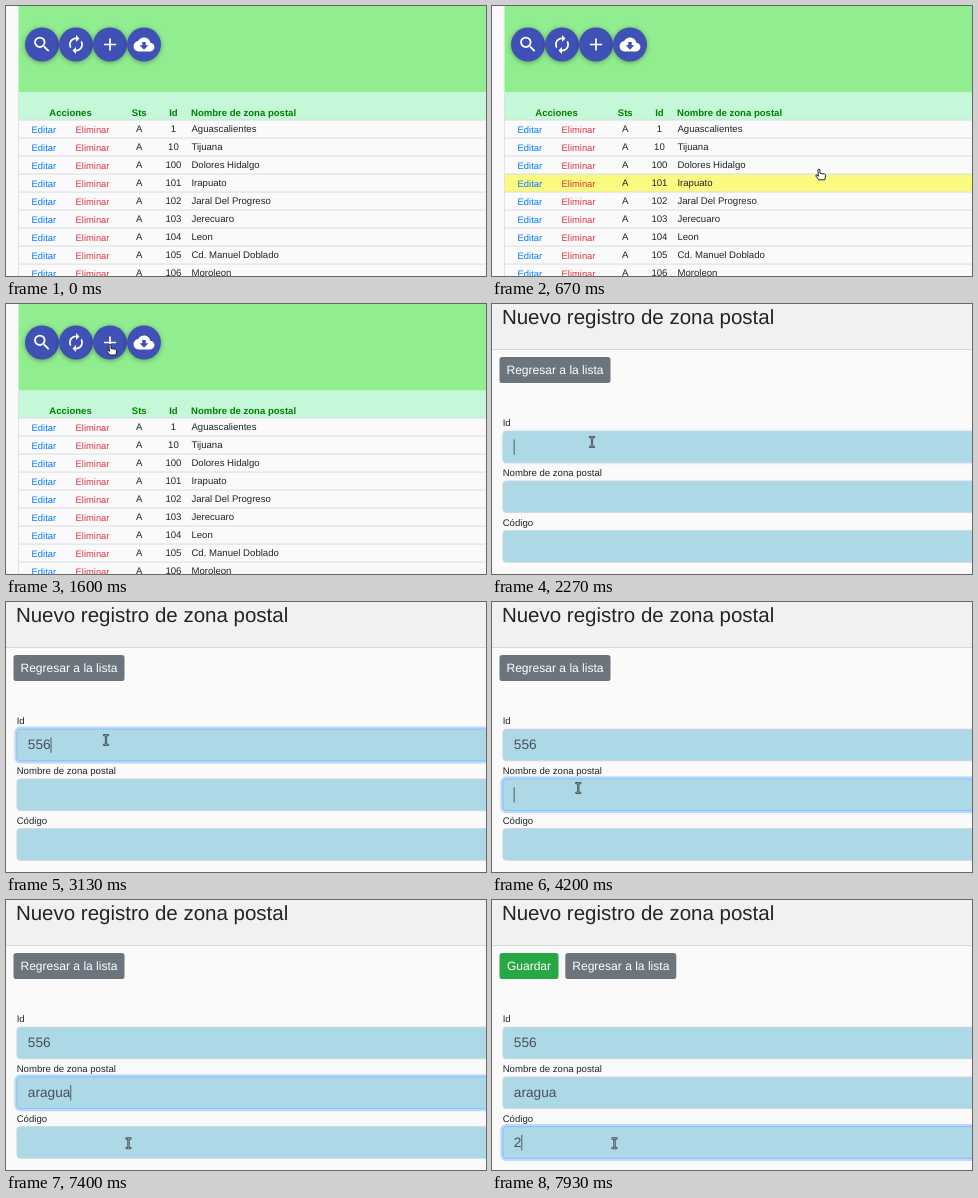
An HTML page that plays this animation: 480 by 270 pixels, repeating every 8000 ms.

```html
<!DOCTYPE html>
<html lang="es">
<head>
<meta charset="utf-8">
<title>Zonas postales</title>
<style>
html, body { margin: 0; width: 100%; height: 100%; overflow: hidden; background: #fafafa; }
svg { display: block; width: 480px; height: 270px; font: 9.6px "Liberation Sans", Arial, sans-serif; fill: #212529; text-rendering: geometricPrecision; }
.head { font-weight: bold; font-size: 9.55px; fill: #008000; }
.link { font-size: 9.4px; }
.mid { text-anchor: middle; }
.fab { filter: drop-shadow(0 1.8px 2.6px rgba(0,0,0,.34)); }
.title { font-size: 20.5px; }
.btn { font-size: 12.05px; fill: #fff; text-anchor: middle; }
.value { font-size: 13.7px; fill: #495057; }
.cursor { stroke-linejoin: round; stroke-linecap: round; }
</style>
</head>
<body>
<svg id="stage" viewBox="0 0 480 270" xmlns="http://www.w3.org/2000/svg"></svg>
<script>
const LOOP = 8000;
const stage = document.getElementById('stage');

function el(parent, name, attrs = {}, text) {
  const node = document.createElementNS('http://www.w3.org/2000/svg', name);
  for (const key in attrs) node.setAttribute(key, attrs[key]);
  if (text !== undefined) node.textContent = text;
  parent.appendChild(node);
  return node;
}
const rect = (p, x, y, width, height, fill, more) => el(p, 'rect', { x, y, width, height, fill, ...more });
const label = (p, x, y, text, cls = '', more) => el(p, 'text', { x, y, class: cls, ...more }, text);
const show = (node, on) => node.setAttribute('visibility', on ? 'visible' : 'hidden');

// --- List page ---
const ROW_TOP = 114, ROW_H = 18;
const zones = [
  [1, 'Aguascalientes'], [10, 'Tijuana'], [100, 'Dolores Hidalgo'], [101, 'Irapuato'],
  [102, 'Jaral Del Progreso'], [103, 'Jerecuaro'], [104, 'Leon'],
  [105, 'Cd. Manuel Doblado'], [106, 'Moroleon']
];
const list = el(stage, 'g');
rect(list, 0, 0, 480, 270, '#fafafa');
rect(list, 12.5, 0, 468, 86.6, '#90ee90');
rect(list, 12.5, 86.6, 468, 27.4, '#c5f8d9');
label(list, 64.5, 110, 'Acciones', 'head mid');
label(list, 133.2, 110, 'Sts', 'head mid');
label(list, 167.4, 110, 'Id', 'head mid');
label(list, 185, 110, 'Nombre de zona postal', 'head');

const rowBacks = zones.map(([id, name], i) => {
  const y = ROW_TOP + i * ROW_H, base = y + 12.4;
  const back = rect(list, 12.5, y, 468, ROW_H, '#fafafa');
  rect(list, 12.5, y - 0.4, 468, 0.9, '#d5d9dc');
  label(list, 25.6, base + 0.6, 'Editar', 'link', { fill: '#007bff' });
  label(list, 69.6, base + 0.6, 'Eliminar', 'link', { fill: '#dc3545' });
  label(list, 133.2, base, 'A', 'mid');
  label(list, 167.4, base, id, 'mid');
  label(list, 185.4, base, name);
  return back;
});
rect(list, 12.2, 87, 0.7, 183, '#d5d9dc');

const icons = [
  { d: 'M14.3 14.3L19.7 19.7M15 9.5a5.5 5.5 0 1 1-11 0a5.5 5.5 0 1 1 11 0', stroke: 2.1 },
  { d: 'M12 6v3l4-4-4-4v3c-4.42 0-8 3.58-8 8 0 1.57.46 3.03 1.24 4.26L6.7 14.8c-.45-.83-.7-1.79-.7-2.8 0-3.31 2.69-6 6-6zm6.76 1.74L17.3 9.2c.44.84.7 1.79.7 2.8 0 3.31-2.69 6-6 6v-3l-4 4 4 4v-3c4.42 0 8-3.58 8-8 0-1.57-.46-3.03-1.24-4.26z' },
  { d: 'M12 5v14M5 12h14', stroke: 2 },
  { d: 'M19.35 10.04C18.67 6.59 15.64 4 12 4 9.11 4 6.6 5.64 5.35 8.04 2.34 8.36 0 10.91 0 14c0 3.31 2.69 6 6 6h13c2.76 0 5-2.24 5-5 0-2.64-2.05-4.78-4.65-4.96zM17 13l-5 5-5-5h3V9h4v4h3z' }
];
icons.forEach(({ d, stroke }, i) => {
  const cx = 36 + i * 34, cy = 38.5;
  el(list, 'circle', { cx, cy, r: 17, fill: '#3f51b5', class: 'fab' });
  el(list, 'path', {
    d, transform: `translate(${cx} ${cy}) scale(.87) translate(-12 -12)`,
    fill: stroke ? 'none' : '#fff', stroke: stroke ? '#fff' : 'none', 'stroke-width': stroke || 0
  });
});

// --- Form page ---
const form = el(stage, 'g');
rect(form, 0, 0, 480, 270, '#fafafa');
rect(form, 0, 0, 480, 45, '#f1f1f1');
rect(form, 0, 45, 480, 0.9, '#d4d4d4');
label(form, 9.9, 20.3, 'Nuevo registro de zona postal', 'title');

function button(x, width, text, fill) {
  const g = el(form, 'g');
  rect(g, x, 53, width, 26, fill, { rx: 2.8 });
  label(g, x + width / 2, 70.3, text, 'btn');
  return g;
}
const back = button(7.5, 111, 'Regresar a la lista', '#6c757d');
const save = button(7.5, 59, 'Guardar', '#28a745');

// Each field: focus span, typed keys [time, text], blink-off spans
const fields = [
  { name: 'Id', y: 127, from: 2240, to: 3990,
    keys: [[2800, '5'], [2930, '55'], [3070, '556']], off: [[3600, 4000]] },
  { name: 'Nombre de zona postal', y: 176.8, from: 3990, to: 7520,
    keys: [[5670, 'a'], [5930, 'ar'], [6070, 'ara'], [6200, 'arag'], [6270, 'aragu'], [6400, 'aragua']],
    off: [[4600, 5200], [6930, 7400]] },
  { name: 'Código', y: 226.5, from: 7520, to: LOOP + 500, keys: [[7930, '2']], off: [] }
];
for (const f of fields) {
  label(form, 10.7, f.y - 5, f.name);
  f.ring = rect(form, 9.6, f.y - 1.2, 490, 34.3, 'none', { rx: 4.6, stroke: '#007bff', 'stroke-opacity': 0.25, 'stroke-width': 2.6 });
  rect(form, 10.9, f.y + 0.1, 490, 31.7, '#add8e6', { rx: 3.4, stroke: '#ced4da', 'stroke-width': 0.8 });
  f.edge = rect(form, 10.9, f.y + 0.1, 490, 31.7, 'none', { rx: 3.4, stroke: '#80bdff', 'stroke-width': 0.9 });
  f.value = label(form, 21.8, f.y + 20.4, '', 'value');
  f.caret = rect(form, 21.7, f.y + 8.4, 0.9, 15.4, '#495057');
}

// --- Mouse pointer, hot spot at 0,0 ---
const pointer = el(stage, 'g', { class: 'cursor' });
const shape = (d, fill, stroke, width) => el(pointer, 'path', { d, fill, stroke, 'stroke-width': width });
const arrow = shape('M0 0V10.6L2.5 8.4L4.2 12.3L6 11.5L4.3 7.7H7.4Z', '#fff', '#222', 1);
const hand = shape('M-.9 .6Q0-.5 .9 .6V4.3L5.6 5.1Q6.8 5.4 6.6 6.8L5.8 10.8H-.2L-3.1 7.1Q-3.4 5.8-2.3 6L-.9 7Z', '#fff', '#222', 1);
const beam = el(pointer, 'g');
for (const [stroke, width] of [['#2c3338', 2.3], ['#a9b4ba', 0.7]])
  el(beam, 'path', { d: 'M-2-4.8H2M0-4.8V4.8M-2 4.8H2', fill: 'none', stroke, 'stroke-width': width, 'stroke-opacity': 0.85 });

// Way points [time, x, y], joined by a smooth curve
const path = [
  [270, 478, 284], [670, 327, 163], [1200, 110, 62.5], [1400, 105, 43], [1670, 104, 40],
  [1930, 104, 52], [2200, 100.5, 136], [2270, 100, 138], [3530, 100, 138], [3730, 86.3, 186],
  [6800, 86.3, 186], [7200, 122.5, 243.3]
];
// Monotone tangent: flat at rests and turning points
function tangent(i, c) {
  const slope = j => path[j] && path[j + 1]
    ? (path[j + 1][c] - path[j][c]) / (path[j + 1][0] - path[j][0]) : 0;
  const a = slope(i - 1), b = slope(i);
  return a * b > 0 ? 2 * a * b / (a + b) : 0;
}
function pointAt(t) {
  const i = path.findIndex(p => p[0] > t);
  if (i === 0) return [500, 300];
  if (i < 0) return path[path.length - 1].slice(1);
  const p = path[i - 1], q = path[i], span = q[0] - p[0], k = (t - p[0]) / span;
  const ease = k * k * (3 - 2 * k);
  return [1, 2].map(c => p[c] + (q[c] - p[c]) * ease
    + span * k * (1 - k) * ((1 - k) * tangent(i - 1, c) - k * tangent(i, c)));
}

const within = (v, a, b) => v >= a && v < b;
function fade(t, at) {
  const k = Math.max(0, Math.min(1, (t - at) / 160));
  return k * k * (3 - 2 * k);
}

function pointerKind(x, y, onForm) {
  if (!onForm) return y > ROW_TOP || (y < 56 && x < 156) ? 'hand' : 'arrow';
  if (within(y, 53, 79) && x < 118) return 'hand';
  return fields.some(f => within(y, f.y, f.y + 32)) ? 'beam' : 'arrow';
}

function draw(t) {
  const onForm = t >= 1670;
  show(list, !onForm);
  form.style.display = onForm ? '' : 'none';

  const [x, y] = pointAt(t);
  const kind = pointerKind(x, y, onForm);
  pointer.setAttribute('transform', `translate(${x} ${y})`);
  show(arrow, kind === 'arrow');
  show(hand, kind === 'hand');
  show(beam, kind === 'beam');

  // row highlight trails the pointer by one tick
  const hover = Math.floor((pointAt(t - 67)[1] - ROW_TOP) / ROW_H);
  rowBacks.forEach((r, i) => r.setAttribute('fill', i === hover ? '#fafa80' : '#fafafa'));

  const ready = t >= 7930;
  show(save, onForm && ready);
  back.setAttribute('transform', `translate(${ready ? 65.8 : 0} 0)`);

  for (const f of fields) {
    const glow = fade(t, f.from) - fade(t, f.to);
    f.ring.setAttribute('opacity', glow);
    f.edge.setAttribute('opacity', glow);
    const text = f.keys.reduce((s, [at, v]) => t >= at ? v : s, '');
    if (f.value.textContent !== text) f.value.textContent = text;
    const width = text ? f.value.getComputedTextLength() : 0;
    f.caret.setAttribute('x', 21.7 + width);
    const lit = within(t, f.from, f.to) && !f.off.some(([a, b]) => within(t, a, b));
    f.caret.setAttribute('opacity', lit ? 1 : 0);
  }
}

// The screen advances at 15 pictures per second
const start = performance.now();
function tick(now) {
  const t = Math.max(0, now - start) % LOOP;
  const step = Math.floor((t + 3.4) * 15 / 1000) % 120;
  draw(Math.round(step * 20 / 3) * 10);
  requestAnimationFrame(tick);
}
tick(start);
</script>
</body>
</html>
```
